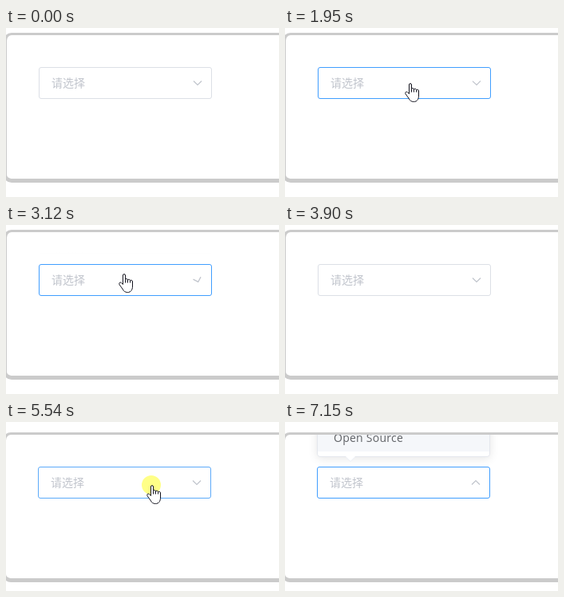
Animation of 342x212 px, one loop 7700 ms. Source, as an HTML page:

```html
<!DOCTYPE html>
<html lang="zh-CN">
<head>
<meta charset="utf-8">
<title>Select</title>
<style>
html, body { margin: 0; width: 100%; height: 100%; overflow: hidden; background: #fff; }
#stage { position: relative; width: 342px; height: 212px; overflow: hidden; font-size: 14px; }
#card {
  position: absolute; left: -3px; top: 6px; width: 400px; height: 188px;
  box-sizing: border-box; overflow: hidden; background: #fff;
  border: solid #cbcbcb; border-width: 3px 4px 5px; border-radius: 10px;
}
#select {
  position: absolute; left: 40px; top: 40px; width: 217px; height: 40px;
  box-sizing: border-box; padding-left: 15px; border: 1px solid; border-radius: 3px;
  line-height: 36px; color: #c0c4cc;
  font-family: "Noto Sans CJK SC", "Noto Sans CJK", sans-serif;
}
#chevron { position: absolute; right: 10px; top: 12px; width: 14px; height: 14px; overflow: visible; }
#popper {
  position: absolute; left: 40px; bottom: 152px; width: 217px;
  box-sizing: border-box; padding: 6px 0; background: #fff;
  border: 1px solid #e4e7ed; border-radius: 4px;
  box-shadow: 0 2px 12px rgba(0, 0, 0, .1); transform-origin: center bottom;
}
#popper div {
  height: 34px; line-height: 34px; padding-left: 20px; color: #606266;
  font-family: "Open Sans", "Noto Sans", sans-serif; letter-spacing: .25px;
}
#popper div.hover { background: #f5f7fa; }
#popper::before, #popper::after {
  content: ""; position: absolute; left: 35px; bottom: -7px;
  border: 6px solid transparent; border-bottom-width: 0; border-top-color: #ebeef5;
}
#popper::after { bottom: -6px; border-top-color: #fff; }
#pointer { position: absolute; left: 0; top: 0; width: 1px; height: 1px; overflow: visible; }
</style>
</head>
<body>
<div id="stage">
  <div id="card">
    <div id="select">请选择
      <svg id="chevron" viewBox="-7 -7 14 14"><path d="M-5 -2.5L0 2.5L5 -2.5" fill="none" stroke="#c0c4cc" stroke-width="1.2"/></svg>
    </div>
    <div id="popper">
      <div>jQuery</div>
      <div>Javascript</div>
      <div class="hover">Open Source</div>
    </div>
  </div>
  <svg id="pointer">
    <circle id="ring" r="12" fill="#ff0" fill-opacity=".47"/>
    <g id="hand" transform="translate(-6 0)" fill="#fff" stroke="#14141f" stroke-linejoin="round">
      <path d="M5.5 2C5.5 .2 8.5 .2 8.5 2V7.5C9 6 11.5 6.3 11.5 8C12 6.8 14.5 7 14.5 8.8C15 7.8 17.5 8 17.5 10V16C17.5 20.5 15.2 23.5 11.5 23.5C8 23.5 6.6 22 5.5 20C4.5 18 2.4 16 1.1 13.8C0 11.5 2 10.3 3.5 11.5L5.5 13.5Z"/>
      <path d="M8.5 7.5V11.5M11.5 8V11.5M14.5 9V11.5" fill="none"/>
    </g>
    <path id="arrow" d="M.5 .8V16.2L4 12.9L6.6 18.6L8.8 17.7L6.3 12.1H11.3Z" fill="#fff" stroke="#000"/>
  </svg>
</div>
<script>
const $ = id => document.getElementById(id);
const show = (id, on) => { $(id).style.display = on ? "" : "none"; };

const LOOP = 7700, STEP = 77.7, CLICK_DELAY = 123;
const clicks = [9, 20, 27, 36, 70, 77, 83];
const scenes = [
  { start: 0, focus: 9, enter: 1, leave: 50, dx: 0, dy: 0,
    path: [[1, 197, 124], [3, 150, 79], [5, 150, 79], [7, 156, 69], [38, 156, 69], [40, 147, 61]] },
  { start: 61, focus: 70, enter: 63, leave: 92, dx: -1, dy: 7,
    path: [[63, 214, 68], [66, 182, 79], [89, 182, 79], [91, 251, 180]] }
];

const clamp = v => Math.min(1, Math.max(0, v));
const mix = (a, b, p) => a + (b - a) * p;

function bezier(x1, y1, x2, y2) {
  const at = (a, b, s) => 3 * a * s * (1 - s) ** 2 + 3 * b * s * s * (1 - s) + s ** 3;
  return x => {
    x = clamp(x);
    let lo = 0, hi = 1;
    for (let i = 0; i < 24; i++) {
      const mid = (lo + hi) / 2;
      if (at(x1, x2, mid) < x) lo = mid; else hi = mid;
    }
    return at(y1, y2, (lo + hi) / 2);
  };
}
const ease = bezier(.25, .1, .25, 1), zoom = bezier(.23, 1, .32, 1);

function along(path, n) {
  const i = path.findIndex(key => key[0] > n);
  if (i < 0) return path[path.length - 1].slice(1);
  const a = path[Math.max(0, i - 1)], b = path[i];
  const p = clamp((n - a[0]) / (b[0] - a[0]));
  return [mix(a[1], b[1], p), mix(a[2], b[2], p)];
}

function drawMenu(t) {
  const done = clicks.filter(c => c * STEP + CLICK_DELAY <= t);
  const open = done.length % 2;
  const age = done.length ? t - done[done.length - 1] * STEP - CLICK_DELAY : LOOP;
  const amount = p => open ? p : 1 - p;
  const size = amount(zoom((age - 15) / 300));
  $("chevron").style.transform = `rotate(${-180 * amount(ease(age / 300))}deg)`;
  $("popper").style.transform = `scaleY(${size})`;
  $("popper").style.opacity = size;
}

function drawPointer(n, scene) {
  const inside = n >= scene.enter && n < scene.leave;
  const [x, y] = along(scene.path, n);
  const overSelect = y < 89 + scene.dy;
  $("pointer").style.transform = `translate(${Math.round(x)}px, ${Math.round(y)}px)`;
  show("pointer", inside);
  show("hand", overSelect);
  show("arrow", !overSelect);
  show("ring", clicks.some(c => n >= c && (n - c) * STEP < CLICK_DELAY));
}

function draw(n) {
  const scene = scenes[n < scenes[1].start ? 0 : 1];
  $("card").style.transform = `translate(${scene.dx}px, ${scene.dy}px)`;
  const focus = n < scene.leave || scene === scenes[1] ? ease((n - scene.focus) * STEP / 150) : 0;
  $("select").style.borderColor =
    `rgb(${mix(220, 64, focus)}, ${mix(223, 158, focus)}, ${mix(230, 255, focus)})`;
  drawMenu(n * STEP);
  drawPointer(n, scene);
}

const begin = performance.now();
function frame() {
  draw(Math.floor((performance.now() - begin) % LOOP / STEP));
  requestAnimationFrame(frame);
}
draw(0);
requestAnimationFrame(frame);
</script>
</body>
</html>
```
